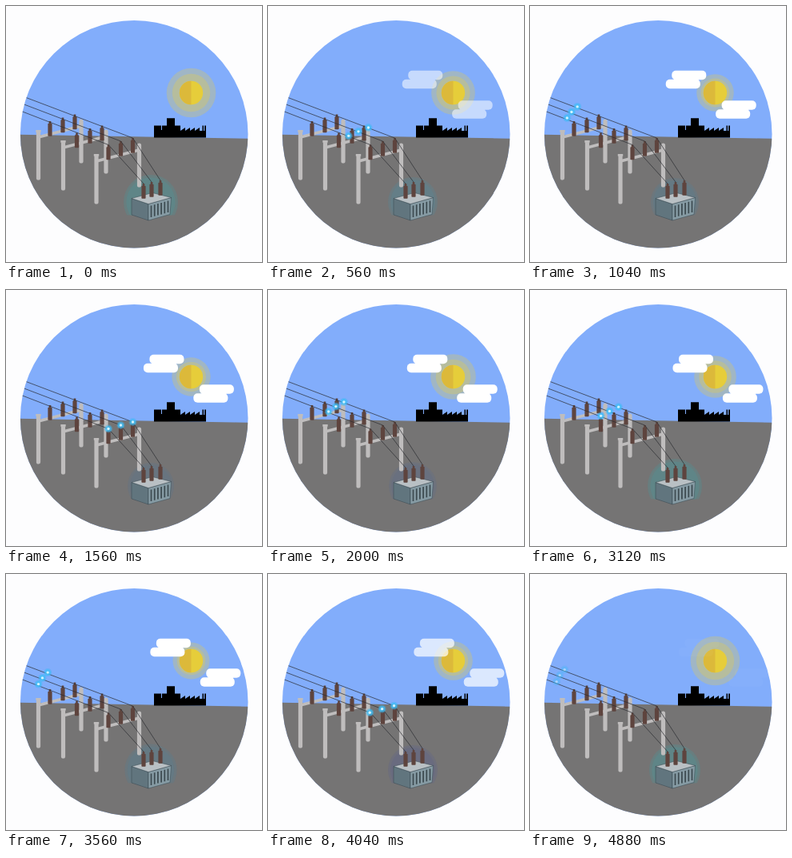
An HTML page that plays this animation: 320x320 px, repeating every 4.92 s.

```html
<!DOCTYPE html>
<html lang="en">
<head>
<meta charset="utf-8">
<title>Substation</title>
<style>
html, body { margin: 0; width: 100%; height: 100%; overflow: hidden; background: #fdfdfe; }
svg { display: block; width: 100vw; height: 100vh; }
</style>
</head>
<body>
<svg viewBox="0 0 320 320">
  <defs>
    <clipPath id="disc"><circle cx="160.200" cy="160.300" r="142.300"/></clipPath>
    <clipPath id="dome"><rect x="140" y="200" width="90" height="61.500"/></clipPath>
    <g id="cloud" fill="#fff">
      <rect x="7.500" y="0" width="43" height="11.500" rx="5"/>
      <rect x="0" y="11" width="43" height="11.500" rx="5"/>
      <rect x="10" y="7" width="31" height="8"/>
    </g>
    <g id="insulator" fill="#5e443e">
      <rect x="-1.300" y="0" width="2.600" height="4"/>
      <rect x="-2.600" y="2.800" width="5.200" height="16" rx=".8"/>
    </g>
    <g id="spark">
      <circle r="5" fill="#38b6f5" opacity=".4"/>
      <circle r="3.600" fill="#3fc0fa" opacity=".7"/>
      <circle r="1.700" fill="#d2f3ff"/>
    </g>
  </defs>
  <g clip-path="url(#disc)">
    <rect width="320" height="320" fill="#82adfb"/>
    <path d="M0 160.500L320 166V320H0Z" fill="#757474"/>
    <g fill="#d9c85c">
      <circle id="ray1" cx="231.500" cy="108.500" opacity=".34"/>
      <circle id="ray2" cx="231.500" cy="108.500" opacity=".38"/>
    </g>
    <circle cx="231.500" cy="108.500" r="14.700" fill="#e6cd3a"/>
    <path d="M231.500 93.800a14.700 14.700 0 0 0 0 29.400Z" fill="#dcb93a"/>
    <path d="M185 164.500V149.500H194V155H195V149.500H201V140.300H211V149.500H218V156L224 152V156L230 152V156L236 152V156L242 152V156H245.500V149.500H247V156H248.200V149.500H250V164.500Z" fill="#000"/>
    <g id="clouds">
      <use href="#cloud" x="164.600" y="80.700"/>
      <use href="#cloud" x="227" y="118.300"/>
    </g>
    <g id="halo" clip-path="url(#dome)">
      <circle id="halo1" cx="181" cy="245" opacity=".22"/>
      <circle id="halo2" cx="181" cy="245" opacity=".2"/>
    </g>
    <g id="gantries" stroke="#bfbdbd" stroke-width="5.200"></g>
    <g stroke="#37474f" stroke-width=".5" stroke-linejoin="round">
      <path d="M157 240.500L178 247.500V268L157 261Z" fill="#61757e"/>
      <path d="M178 247.500L206.500 239.500L205 260.500L178 268Z" fill="#869ba4"/>
      <path d="M157 240.500L183 233.500L206.500 239.500L178 247.500Z" fill="#b9c0c4"/>
    </g>
    <path id="fins" stroke="#3b494f" stroke-width="1.700"/>
    <g id="bushings"></g>
    <g id="wires" fill="none" stroke="#2a2c30" stroke-width=".7"></g>
    <g id="sparks"></g>
  </g>
</svg>
<script>
const LOOP = 4920, PULSE = LOOP / 4;
const el = id => document.getElementById(id);
const mix = (a, b, u) => a + (b - a) * u;
const clamp = v => Math.max(0, Math.min(1, v));

function add(parent, tag, attrs) {
  const node = document.createElementNS("http://www.w3.org/2000/svg", tag);
  for (const k in attrs) node.setAttribute(k, attrs[k]);
  return parent.appendChild(node);
}
const place = (node, x, y) => node.setAttribute("transform", `translate(${x.toFixed(2)} ${y.toFixed(2)})`);

// Each gantry: top of the left pole, then three insulator tops
const gantries = [
  [40.5, 155, [[55, 144], [71, 139.5], [86, 135.5]]],
  [71.5, 168, [[88.5, 158.5], [105, 153], [120, 149.5]]],
  [113, 185, [[128, 173.5], [143.5, 169], [158.5, 165]]]
];
for (const [x, y, tops] of gantries) {
  const g = el("gantries");
  add(g, "path", { d: `M${x + 53.5} ${y - 11}v50`, "stroke-linecap": "round" });
  add(g, "path", { d: `M${x} ${y + 9}l53.500 -14`, "stroke-width": 3.6 });
  add(g, "path", { d: `M${x} ${y + 3}v57`, "stroke-linecap": "round" });
  add(g, "path", { d: `M${x - 3.2} ${y + 1.4}h6.400`, "stroke-width": 2.6 });
  for (const [ix, iy] of tops) place(add(g, "use", { href: "#insulator", stroke: "none" }), ix, iy);
}

let fins = "";
for (let i = 0; i < 6; i++) fins += `M${181.5 + i * 4.2} ${249.5 - i * 1.2}v14.500`;
el("fins").setAttribute("d", fins);

// Lines run from the transformer over the last gantry and off to the left
const ends = [[172, 222], [182, 220], [193, 218]];
const exits = [[18, 131], [20, 122], [22, 113.3]];
const stops = [[33, 134.5], [37, 126.5], [43, 119.5]];
const lastTops = gantries[2][2];
const sparks = ends.map((end, i) => {
  place(add(el("bushings"), "use", { href: "#insulator" }), ...end);
  add(el("wires"), "polyline", { points: [end, lastTops[i], exits[i]].join(" ") });
  return add(el("sparks"), "use", { href: "#spark" });
});

// time, radius, colour of the transformer glow
const TEAL = [62, 160, 164], BLUE = [72, 140, 166], VIOLET = [88, 92, 144];
const glow = [
  [0, 34, TEAL], [560, 31, BLUE], [1560, 29, [84, 116, 146]], [2520, 31, VIOLET],
  [3120, 34, TEAL], [4040, 31, VIOLET], [4880, 32, TEAL], [LOOP, 34, TEAL]
];

function drawGlow(t) {
  const i = glow.findIndex(k => k[0] > t);
  const [t0, r0, c0] = glow[i - 1], [t1, r1, c1] = glow[i];
  const u = (1 - Math.cos(Math.PI * (t - t0) / (t1 - t0))) / 2;
  const r = mix(r0, r1, u);
  el("halo1").setAttribute("r", r);
  el("halo2").setAttribute("r", r * 0.9);
  el("halo").setAttribute("fill", `rgb(${c0.map((c, j) => Math.round(mix(c, c1[j], u)))})`);
}

function drawSparks(t) {
  const p = t % PULSE;
  const alpha = clamp((p - 60) / 60) * clamp((PULSE + 10 - p) / 90);
  const climb = p < 325;
  const u = climb ? clamp((p - 60) / 265) : 1 - Math.pow(1 - clamp((p - 345) / 850), 1.15);
  sparks.forEach((s, i) => {
    const [a, b] = climb ? [ends[i], lastTops[i]] : [lastTops[i], stops[i]];
    place(s, mix(a[0], b[0], u), mix(a[1], b[1], u));
    s.setAttribute("opacity", alpha);
  });
}

function draw(t) {
  const r = 26.8 + 4 * Math.cos(2 * Math.PI * t / (LOOP / 2));
  el("ray1").setAttribute("r", r);
  el("ray2").setAttribute("r", r * 0.77);
  place(el("clouds"), 0.8 + t * 0.0042, 0);
  el("clouds").setAttribute("opacity", Math.min(clamp(t / 1020), clamp((LOOP - t) / 1230)));
  drawGlow(t);
  drawSparks(t);
}

const start = performance.now();
function tick() {
  draw((performance.now() - start) % LOOP);
  requestAnimationFrame(tick);
}
tick();
</script>
</body>
</html>
```
